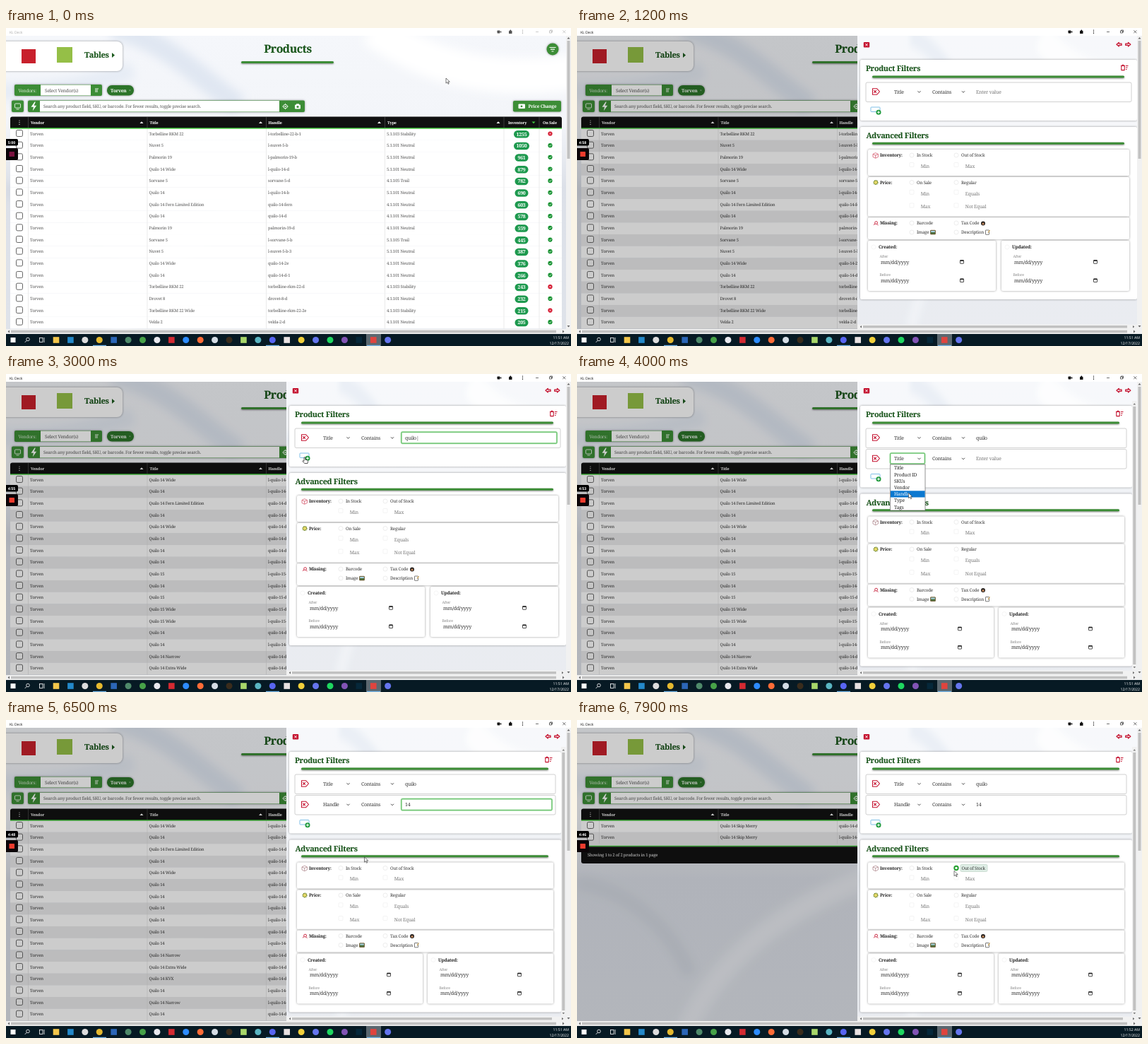
An HTML page that plays this animation: 800x450 px, repeating every 8000 ms.

```html
<!DOCTYPE html>
<html lang="en">
<head>
<meta charset="utf-8">
<title>Product filters</title>
<style>
  html, body { margin: 0; width: 100%; height: 100%; overflow: hidden; background: #fff; }
  svg { display: block; width: 100%; height: 100%; }
  text { font-family: "Noto Serif", serif; letter-spacing: -0.03em; text-rendering: geometricPrecision; white-space: pre; }
  .b { font-weight: 700; }
  .sans { font-family: "Open Sans", sans-serif; letter-spacing: 0; }
  .mid { text-anchor: middle; }
  .end { text-anchor: end; }
  .title { font-weight: 700; fill: #1b5a1d; filter: drop-shadow(0.6px 0.8px 0.5px #0005); }
  .card { filter: drop-shadow(0 0.5px 1.5px #0006); }
  .bar { filter: drop-shadow(0 1px 0.8px #0007); }
</style>
</head>
<body>
<svg viewBox="0 0 800 450" xmlns="http://www.w3.org/2000/svg">
  <defs>
    <linearGradient id="sky" x1="0" y1="0" x2="0" y2="1">
      <stop offset="0" stop-color="#f5f7fb"/>
      <stop offset=".3" stop-color="#f3f5f9"/>
      <stop offset=".5" stop-color="#dce0e8"/>
      <stop offset="1" stop-color="#dfe3ea"/>
    </linearGradient>
    <filter id="soft" x="-20%" y="-20%" width="140%" height="140%"><feGaussianBlur stdDeviation="7"/></filter>
    <clipPath id="view"><rect x="0" y="11" width="793" height="415"/></clipPath>
    <clipPath id="pane"><rect x="397" y="11" width="396" height="415"/></clipPath>
    <g id="swoosh">
      <rect width="800" height="450" fill="url(#sky)"/>
      <g filter="url(#soft)" fill="none">
        <path d="M150 0C230 20 260 60 330 110" stroke="#e0e7f2" stroke-width="30"/>
        <path d="M-20 90C60 90 120 80 180 60" stroke="#e6ecf5" stroke-width="24"/>
        <path d="M520 0C600 60 700 80 820 60" stroke="#fff" stroke-width="50"/>
        <path d="M150 450C190 350 280 270 420 220" stroke="#e9ecf2" stroke-width="30"/>
        <path d="M0 230C70 240 130 290 160 360" stroke="#d3d8e1" stroke-width="20"/>
      </g>
    </g>
  </defs>
  <rect width="800" height="450" fill="#fff"/>
  <g clip-path="url(#view)">
    <use href="#swoosh"/>
    <g id="page"></g>
    <g id="table"></g>
    <rect id="dim" y="11" width="793" height="415"/>
    <g id="panel"></g>
  </g>
  <g id="frame"></g>
  <g id="live"></g>
  <g id="cursor"></g>
</svg>
<script>
const LOOP = 8000;
const GREEN = '#3c8d36', RED = '#c4122f', INK = '#333', PALE = '#777';
const BRAND = 'Torven', MODEL = 'Quilo', QUERY = 'quilo';
const $ = id => document.getElementById(id);

const text = (x, y, s, size = 5.9, fill = INK, cls = '') =>
  `<text x="${x}" y="${y}" font-size="${size}" class="${cls}" ${cls.includes('title') ? '' : `fill="${fill}"`}>${s}</text>`;
const rect = (x, y, w, h, fill, r = 0, more = '') =>
  `<rect x="${x}" y="${y}" width="${w}" height="${h}" rx="${r}" fill="${fill}" ${more}/>`;
const disc = (x, y, r, fill, more = '') => `<circle cx="${x}" cy="${y}" r="${r}" fill="${fill}" ${more}/>`;
const line = (d, color, w = 1, fill = 'none') =>
  `<path d="${d}" stroke="${color}" stroke-width="${w}" fill="${fill}" stroke-linejoin="round"/>`;
const shape = (d, fill) => `<path d="${d}" fill="${fill}"/>`;
const card = (x, y, w, h, r = 2) => rect(x, y, w, h, '#fff', r, 'class="card"');
const bar = (x, y, w) => rect(x, y, w, 3, GREEN, 1.5, 'class="bar"');
const each = (list, f) => list.map(f).join('');

// Table data
const NEUTRAL = '1.101 Neutral', STABLE = '1.103 Stability', TRAIL = '1.105 Trail';
const allRows = [
  ['Torbelline RKM 22', 'l-torbelline-22-b-1', '5.' + STABLE, 1255],
  ['Nuvet 5', 'l-nuvet-5-b', '5.' + NEUTRAL, 1050],
  ['Palmorin 19', 'l-palmorin-19-b', '5.' + NEUTRAL, 961],
  [MODEL + ' 14 Wide', 'l-quilo-14-d', '5.' + NEUTRAL, 879],
  ['Sorvane 5', 'sorvane-5-d', '4.' + TRAIL, 782],
  [MODEL + ' 14', 'l-quilo-14-b', '5.' + NEUTRAL, 690],
  [MODEL + ' 14 Fern Limited Edition', 'quilo-14-fern', '4.' + NEUTRAL, 603],
  [MODEL + ' 14', 'quilo-14-d', '4.' + NEUTRAL, 578],
  ['Palmorin 19', 'palmorin-19-d', '4.' + NEUTRAL, 559],
  ['Sorvane 5', 'l-sorvane-5-b', '5.' + TRAIL, 445],
  ['Nuvet 5', 'l-nuvet-5-b-3', '5.' + NEUTRAL, 387],
  [MODEL + ' 14 Wide', 'quilo-14-2e', '4.' + NEUTRAL, 376],
  [MODEL + ' 14', 'quilo-14-d-1', '4.' + NEUTRAL, 266],
  ['Torbelline RKM 22', 'torbelline-rkm-22-d', '4.' + STABLE, 243],
  ['Drovet 8', 'drovet-8-d', '4.' + NEUTRAL, 232],
  ['Torbelline RKM 22 Wide', 'torbelline-rkm-22-2e', '4.' + STABLE, 215],
  ['Velda 2', 'velda-2-d', '4.' + NEUTRAL, 205]
];
// A leading "l" gives the handle its l- prefix
const expand = list => list.split(',').map(item => {
  const label = item.replace(/^l/, '');
  const prefix = item === label ? '' : 'l-';
  return [`${MODEL} ${label}`, `${prefix}${QUERY}-${label.slice(0, 2)}-d`, '4.' + NEUTRAL, 100];
});
const START = 'l14 Wide,l14,14 Fern Limited Edition,14,14 Wide,14,14,l14,';
const dataSets = [
  allRows,
  expand(START + 'l15,l14,15,15 Wide,l15 Wide,14,l14,14 Narrow,14 Extra Wide'),
  expand(START + 'l14,14,l14,14 Narrow,14 Extra Wide,14 KVX,l14,l14 Narrow,14'),
  expand('14 Skip Merry,l14 Skip Merry')
];

const COLS = [31.5, 200, 368.5, 536.5, 705, 755];
const PITCH = 16.67, TOP = 142;

function tableRow([name, handle, type, stock], i, striped) {
  const y = TOP + i * PITCH, mid = y + 7.5, base = mid + 2.1;
  const ink = striped ? INK : '#555';
  const sale = !type.includes('Stab');
  return rect(6, y, 781, PITCH, striped && i % 2 ? '#ebebec' : '#fff') +
    each(COLS, x => line(`M${x} ${y}v${PITCH}`, '#d4d4d4', .5)) +
    rect(14.5, mid - 5, 9, 9, '#fff8', 1.8, 'stroke="#555" stroke-width=".9"') +
    each([BRAND, name, handle, type], (s, n) => text(COLS[n] + 2.5, base, s, 5.9, ink)) +
    rect(stock > 999 ? 719 : 720.5, mid - 4.5, stock > 999 ? 22 : 19, 10.5, '#1d994e', 5.2) +
    text(730, mid + 3.2, stock, 7, '#fff', 'b mid') +
    disc(770.5, mid, 3.1, sale ? '#14912f' : '#d4142c') +
    line(sale ? `M769 ${mid}l1.2 1.2 2-2.3` : `M769.3 ${mid - 1.2}l2.4 2.4m0-2.4l-2.4 2.4`, '#fff', .8);
}

function table(set, striped) {
  const rows = dataSets[set];
  const heads = ['Vendor', 'Title', 'Handle', 'Type', 'Inventory', 'On Sale'];
  const headX = [35, 203.5, 371.5, 540, 711, 760];
  let out = rect(6, 125.5, 781, 18, '#111', 3) +
    each(heads, (h, i) => text(headX[i], 136, h, 5.5, '#fff', 'b')) +
    each(COLS, x => line(`M${x} 126v16`, '#666', .5)) +
    each([192, 360.5, 528.5, 697], x => shape(`M${x - 2.5} 135l2.5-2.7 2.5 2.7z`, '#fff')) +
    shape('M744.5 132.5h5l-2.5 2.7z', '#3fc43f') +
    each([131, 133.7, 136.4], y => disc(19, y, .6, '#fff')) +
    each(rows, (row, i) => tableRow(row, i, striped)) + rect(6, 141.2, 781, 1.4, '#35c22f');
  if (rows.length < 5) {
    out += rect(6, 175.3, 781, 3, '#ebebec') + rect(6, 177.8, 781, 1.4, '#35c22f') +
      shape('M6 179.2H787V200q0 3-3 3H9q-3 0-3-3z', '#111') +
      text(15, 193, 'Showing 1 to 2 of 2 products in 1 page', 5.9, '#fff');
  }
  return out;
}

function page() {
  const button = (x, y, w, h) => rect(x, y, w, h, GREEN, 2, 'class="card"');
  return card(-10, 19, 175, 42, 8) +
    rect(22, 30, 20, 20, '#c8202c') + rect(72, 27, 22, 22, '#95bf47') +
    text(111, 42.3, 'Tables', 11.2, '', 'title') + shape('M150 35l4 3.5-4 3.5z', '#1b5a1d') +
    text(399, 35.2, 'Products', 15.8, '', 'title mid') + bar(333, 47, 131) +
    disc(774, 30, 8.5, GREEN, 'class="card"') + line('M769.5 27.5h9M771 30.2h6M772.5 33h3', '#fff', 1.2) +
    button(12, 80, 124, 16) + rect(49, 80.5, 71, 15, '#fff') +
    text(17.5, 90.5, 'Vendors:', 6.4, '#dcebd9') + text(55, 90.5, 'Select Vendor(s)', 6.6, '#555') +
    line('M126 86h5M126 88h4M126 90h4', '#fff', .9) +
    rect(143, 81, 38, 14.5, '#2c7429', 7, 'class="card"') + text(148, 90.5, BRAND, 6.6, '#fff', 'b') +
    text(174, 90.3, '×', 5, '#cdc') +
    button(8, 102.5, 17, 16.5) + rect(12.5, 107, 8, 6, 'none', 1, 'stroke="#fff" stroke-width=".8"') +
    line('M14.5 115h4', '#fff', .8) +
    button(31, 102.5, 392, 16.5) + rect(48, 103, 339, 15.5, '#fff') +
    shape('M40.5 104.5l-5 7.3h3.5l-1.2 5.4 5.4-7.4h-3.6l2.2-5.3z', '#fff') +
    text(53, 113, 'Search any product field, SKU, or barcode. For fewer results, toggle precise search.', 6.1, '#555') +
    disc(395.5, 111, 2.8, 'none', 'stroke="#fff" stroke-width=".9"') + disc(395.5, 111, 1, '#fff') +
    line('M395.5 106.8v2M395.5 113.2v2M391.3 111h2M397.7 111h2', '#fff', .8) +
    rect(409, 108.5, 8, 6, '#fff', 1) + rect(411, 107.3, 4, 2, '#fff') + disc(413, 111.5, 1.6, GREEN) +
    button(718, 103, 68, 15.5) + rect(725.5, 107.5, 9.5, 6.5, '#fff', 1) + disc(730, 110.8, 1.4, GREEN) +
    text(739.5, 113, 'Price Change', 6.4, '#fff', 'b');
}

const chevron = (x, y) => line(`M${x - 2} ${y - 1}l2 2 2-2`, '#333', .9);
const ring = (x, y, w, h) => rect(x, y, w, h, '#fff', 2, 'stroke="#a9e3ab" stroke-width="2.2"') +
  rect(x, y, w, h, 'none', 1.5, 'stroke="#4fae54" stroke-width=".7"');

function filterRow(y, right, o) {
  const caret = o.focus && o.blink ? '|' : '';
  const value = o.value + caret;
  return rect(409, y, right - 409, 27.5, '#fff', 2, 'stroke="#c4c4c4" stroke-width=".8"') +
    line(`M418.5 ${y + 8.7}h6l4 4.3-4 4.3h-6z`, RED, 1.1) +
    line(`M420.3 ${y + 11.2}l3.6 3.6m0-3.6l-3.6 3.6`, RED, 1.1) +
    (o.pick ? ring(443.5, y + 5.5, 49, 15) : '') +
    text(449, y + 15.5, o.field, 6.9) + chevron(484.5, y + 13.3) +
    text(503, y + 15.5, 'Contains', 6.9) + chevron(547, y + 13.3) +
    (o.focus ? ring(559.8, y + 5.2, right - 5 - 559.8, 16) : '') +
    text(565, y + 15.5, value || 'Enter value', 6.9, value ? INK : PALE);
}

function option(x, y, label, on = false) {
  return on
    ? rect(x + 6, y - 5, 38, 10, '#dfeee6', 1.5, 'stroke="#b7cfc0" stroke-width=".6"') +
      disc(x, y, 2.7, '#fff', 'stroke="#25a030" stroke-width="2"') + text(x + 7.5, y + 2.2, label, 6.2)
    : disc(x, y, 3, '#fff', 'stroke="#e6e6e6" stroke-width=".7"') + text(x + 7, y + 2.2, label, 6.2);
}
const field = (x, y, label) => rect(x - 3, y - 5, 6, 6, '#fff', 1, 'stroke="#ececec" stroke-width=".6"') +
  text(x + 12.8, y + 2.4, label, 6.7, PALE);

function dateBox(x, w, label) {
  const day = (name, y) => text(x + 16.5, y, name, 5.2, '#888') + text(x + 18, y + 8.5, 'mm/dd/yyyy', 7.1) +
    rect(x + w - 50.5, y + 3.7, 5, 4.6, '#fff', .5, 'stroke="#222" stroke-width=".8"') +
    rect(x + w - 50.5, y + 3.4, 5, 1.5, '#222');
  return card(x, 301, w, 71) + disc(x + 8, 310, 3, '#fff', 'stroke="#eee" stroke-width=".6"') +
    text(x + 15, 312.2, label, 6.4, '#222', 'b') + day('After', 325) + day('Before', 351.3);
}

function advanced(k, s) {
  const w = 370 - k, col = s.two ? 178 : 181;
  const box = s.two ? '#a87c82' : '#d0435a';
  return card(401, 140, 392 - k, 244) +
    text(409.5, 156, 'Advanced Filters', 10.9, '', 'title') + bar(418, 161.7, 357 - k) +
    card(412, 172, w, 37) + card(412, 211, w, 56) + card(412, 268, w, 31) +
    line('M419 178.5l3.7-1.8 3.7 1.8v4l-3.7 1.8-3.7-1.8zM419 178.5l3.7 1.6 3.7-1.6M422.7 180v4', box, .7) +
    text(429, 182.2, 'Inventory:', 6.3, '#222', 'b') +
    option(474, 180, 'In Stock') + option(537, 180, 'Out of Stock', s.radio) +
    field(474, 195.5, 'Min') + field(537, 195.5, 'Max') +
    disc(423, 218.5, 2.8, '#e7d96a', 'stroke="#5c7a1d" stroke-width="1.4" stroke-dasharray="1.3 .8"') +
    text(429, 220.7, 'Price:', 6.3, '#222', 'b') +
    option(474, 218.5, 'On Sale') + option(537, 218.5, 'Regular') +
    field(474, 234.3, 'Min') + field(537, 234.3, 'Equals') +
    field(474, 253, 'Max') + field(537, 253, 'Not Equal') +
    disc(423.6, 275.6, 1.9, '#fff', `stroke="${RED}" stroke-width=".9"`) + line('M422 277l-2 1.8M424.5 277.5l2 1.5', RED, .9) +
    text(429, 278.2, 'Missing:', 6.3, '#222', 'b') +
    option(474, 276, 'Barcode') + option(537, 276, 'Tax Code') +
    disc(575, 276.5, 3, '#2a2522') + disc(575, 277, 1.5, '#c98b5e') +
    option(474, 289, 'Image') + rect(500.5, 286.3, 7, 5.6, '#4b6f3d', .5, 'stroke="#7b5a33" stroke-width=".8"') +
    rect(501.2, 287, 5.6, 2, '#a8d2e4') +
    option(537, 289, 'Description') + rect(578.5, 286, 5, 6.3, '#fff', .4, 'stroke="#444" stroke-width=".7"') +
    line('M584.5 286l-2.5 3.6', '#d29b2a', 1) +
    dateBox(412, col, 'Created:') + dateBox(782 - k - col, col, 'Updated:');
}

function panel(s) {
  const k = s.two ? 7 : 0, d = s.two ? 29.5 : 0, right = 785 - k;
  const bin = 770 - k, add = 112 + d;
  const names = ['Title', 'Product ID', 'SKUs', 'Vendor', 'Handle', 'Type', 'Tags'];
  let out = rect(397, 11, 396, 415, '#fbfcfd') +
    '<g clip-path="url(#pane)"><use href="#swoosh" transform="translate(397 11) scale(.5 .93)" opacity=".6"/></g>' +
    rect(405.8, 20, 8.4, 7.5, RED, 1) + line('M408.3 22l3.4 3.4m0-3.4l-3.4 3.4', '#fff', 1) +
    line('M764 23.3l3.3-2.8v1.7h3.7v2.2h-3.7v1.7zM783.8 23.3l-3.3-2.8v1.7h-3.7v2.2h3.7v1.7z', RED, 1.3) +
    card(401, 45, 392 - k, 86 + d) +
    text(409, 61, 'Product Filters', 10.8, '', 'title') + bar(418, 67.4, 357 - k) +
    line(`M${bin} 53.4h6M${bin + .8} 53.6v6h4.4v-6M${bin + 2} 52.3h2M${bin + 7} 53.5h3.5M${bin + 7} 56h2.6M${bin + 7} 58.5h1.6`, RED, 1.1) +
    filterRow(77, right, { field: 'Title', value: s.first, focus: s.focus === 1, blink: s.blink });
  if (s.two) {
    out += filterRow(106.5, right, { field: s.handle ? 'Handle' : 'Title', pick: s.pick,
      value: s.second, focus: s.focus === 2, blink: s.blink });
  }
  out += rect(416, add, 13, 6.5, '#fff', .8, 'stroke="#7fbfe6" stroke-width="1"') +
    disc(427, add + 7.3, 3.5, '#1f9a3c') + line(`M427 ${add + 5.3}v4M425 ${add + 7.3}h4`, '#fff', 1.1) +
    `<g transform="translate(0 ${d})">${advanced(k, s)}</g>`;
  if (s.open) {
    out += rect(443.5, 128, 49.5, 65, '#fff', 0, 'stroke="#666" stroke-width=".7"') +
      each(names, (n, i) => (i === s.hover ? rect(444, 128.5 + i * 9.2, 48.6, 9.2, '#0b78d0') : '') +
        text(449, 135.4 + i * 9.2, n, 6.7, i === s.hover ? '#fff' : '#222'));
  }
  out += rect(397, 419.5, 396, 6.5, '#f1f1f1') + rect(405, 421, s.two ? 368 : 374, 3.5, '#c1c1c1') +
    shape('M403 421l-2.3 1.8 2.3 1.8zM787 421l2.3 1.8-2.3 1.8z', '#666');
  if (s.two) {
    out += rect(786, 38, 6.5, 381, '#f1f1f1') + rect(787.3, 46, 4, 365, '#c1c1c1') +
      shape('M787.5 43.5l1.8-2.2 1.8 2.2zM787.5 414l1.8 2.2 1.8-2.2z', '#777');
  }
  return out;
}

function frame() {
  const colors = ['#f3c64b', '#2489ca', '#ddd', '#e5b92f', '#2c66b8', '#4f8a6a', '#47a248', '#e8e8ee', '#d42a32',
    '#2d8cff', '#ff6c37', '#d5dde5', '#3a2c1c', '#a8d76a', '#5ab5c2', '#5865f2', '#e9e2e2', '#f2d03b', '#6575ee',
    '#1ed760', '#8254b5', '#06283a', '#e0443e', '#6575ee'];
  const squares = [0, 1, 4, 8, 13, 16, 21, 22];
  return rect(793, 11, 7, 415, '#f1f1f1') + rect(794.5, 18, 4, 167, '#c1c1c1') +
    shape('M794.5 15.5l2-2.4 2 2.4zM794.5 421l2 2.4 2-2.4z', '#666') +
    rect(0, 426, 800, 7, '#f1f1f1') + rect(7, 427.7, 772, 3.6, '#c1c1c1') +
    shape('M5 427.5l-2.5 2 2.5 2zM788 427.5l2.5 2-2.5 2z', '#666') +
    rect(0, 433, 800, 17, '#071a24') + rect(510, 433, 21, 17, '#5b6870') +
    each([123, 368, 511], x => rect(x, 448.8, 19, 1.2, '#76b9ed')) +
    rect(6.5, 438, 7, 7, '#fff') +
    disc(31, 440.5, 2.3, 'none', 'stroke="#fff" stroke-width=".8"') + line('M29.3 442.3l-2.5 2.5', '#fff', .9) +
    rect(47.5, 438.5, 4.5, 6, 'none', 0, 'stroke="#fff" stroke-width=".8"') + line('M54 438v7', '#fff', .8) +
    each(colors, (c, i) => {
      const x = 71 + i * 20.42;
      return squares.includes(i) ? rect(x - 4.3, 437.2, 8.6, 8.6, c) : disc(x, 441.5, 4.5, c);
    });
}

function live(s) {
  const ink = s.active ? '#111' : '#aaa', icon = s.active ? '#111' : '#555';
  return text(5, 7.5, 'KL Deck', 5, ink, 'sans') +
    rect(695.5, 3.5, 4, 4, icon, .7) + shape('M699.5 5.5l1.8-1.5v3z', icon) +
    rect(712, 4, 4.5, 4, icon, .5) + disc(714.3, 3.7, 1.1, icon) +
    each([3.2, 5.3, 7.4], y => disc(731.5, y, .65, ink)) +
    line('M750 5.5h4', ink, .6) + line('M769.5 4h3v3h-3zM770.5 4v-1h3v3h-1', ink, .6) +
    line('M788.3 3.3l4 4m0-4l-4 4', ink, .6) +
    rect(-3, 157, 20, 9.5, '#000', 2) + text(8, 163.7, s.clock, 5.2, '#fff', 'sans b mid') +
    rect(-3, 170, 20, 17, '#0b0508', 2) + rect(4.5, 175, 7.5, 7, s.active ? '#f03c2e' : '#7a1240', .6) +
    text(797, 440, s.late ? '11:52 AM' : '11:51 AM', 5.2, '#fff', 'sans end') +
    text(797, 448, '12/17/2022', 5.2, '#fff', 'sans end');
}

const arrow = '<path d="M0 0v7.2l1.8-1.6 1.2 2.7 1.2-.5-1.2-2.7h2.3z" fill="#fff" stroke="#222" stroke-width=".6"/>';
const hand = '<path d="M0 .8q.9-1 1.8 0v3l3 .8q1 .4.8 1.6l-.6 3H.8L-2.2 6q.2-1.2 2.2 0z" fill="#fff" stroke="#111" stroke-width=".7"/>';

// time, x, y
const path = [[0, 623, 71], [100, 630, 68], [430, 772, 29], [700, 766, 32], [1000, 766, 32], [1300, 600, 90], [2400, 600, 90],
  [2900, 422, 117], [3150, 422, 118], [3550, 468, 121], [3720, 468, 122], [4000, 469.5, 168.5], [4280, 469.5, 169],
  [4650, 600, 119], [5700, 600, 119], [6350, 507.5, 194], [6500, 507.5, 194], [6900, 537, 209], [7250, 537, 210],
  [7600, 534, 213.5], [LOOP, 534, 213.5]];

function pointer(t) {
  const i = path.findIndex(p => p[0] > t);
  const [t0, x0, y0] = path[i - 1], [t1, x1, y1] = path[i];
  const u = (t - t0) / (t1 - t0), e = u * u * (3 - 2 * u);
  return [x0 + (x1 - x0) * e, y0 + (y1 - y0) * e];
}

const clamp = (v, a, b) => Math.min(b, Math.max(a, v));
const within = (t, a, b) => t >= a && t < b;
const typed = (word, t, start, pace) => word.slice(0, clamp(Math.floor((t - start) / pace), 0, word.length));
const cache = {};
function put(id, key, make) {
  if (cache[id] === key) return;
  cache[id] = key;
  $(id).innerHTML = make();
}

function draw(t) {
  const [x, y] = pointer(t);
  const left = Math.ceil(300 - t * .00185);
  const open = within(t, 3650, 4250);
  const s = {
    two: t >= 3200,
    first: typed(QUERY, t, 1600, 150),
    second: typed('14', t, 4850, 200),
    focus: within(t, 1400, 3200) ? 1 : within(t, 4700, 7050) ? 2 : 0,
    blink: t % 1000 < 500,
    open, pick: within(t, 3650, 4700), handle: t >= 4250,
    hover: open ? clamp(Math.floor((y - 128.5) / 9.2), 0, 6) : -1,
    radio: t >= 7050
  };
  const status = {
    active: t >= 300, late: t >= 7300,
    clock: `${Math.floor(left / 60)}:${String(left % 60).padStart(2, '0')}`
  };
  const set = t < 2600 ? 0 : t < 5700 ? 1 : t < 7400 ? 2 : 3;
  const striped = t >= 300;
  put('table', `${set} ${striped}`, () => table(set, striped));
  put('panel', JSON.stringify(s), () => panel(s));
  put('live', JSON.stringify(status), () => live(status));

  const slide = clamp((t - 560) / 320, 0, 1);
  $('panel').setAttribute('transform', `translate(${403 * Math.pow(1 - slide, 1.83)} 0)`);
  $('dim').setAttribute('opacity', .2 * clamp((t - 500) / 250, 0, 1));

  const overLink = within(t, 2850, 3200);
  put('cursor', overLink, () => overLink ? hand : arrow);
  const hidden = within(t, 1150, 2450) || within(t, 4650, 5750);
  $('cursor').setAttribute('visibility', hidden ? 'hidden' : 'visible');
  $('cursor').setAttribute('transform', `translate(${x} ${y})`);
}

$('page').innerHTML = page();
$('frame').innerHTML = frame();
function tick() {
  draw(performance.now() % LOOP);
  requestAnimationFrame(tick);
}
tick();
</script>
</body>
</html>
```
